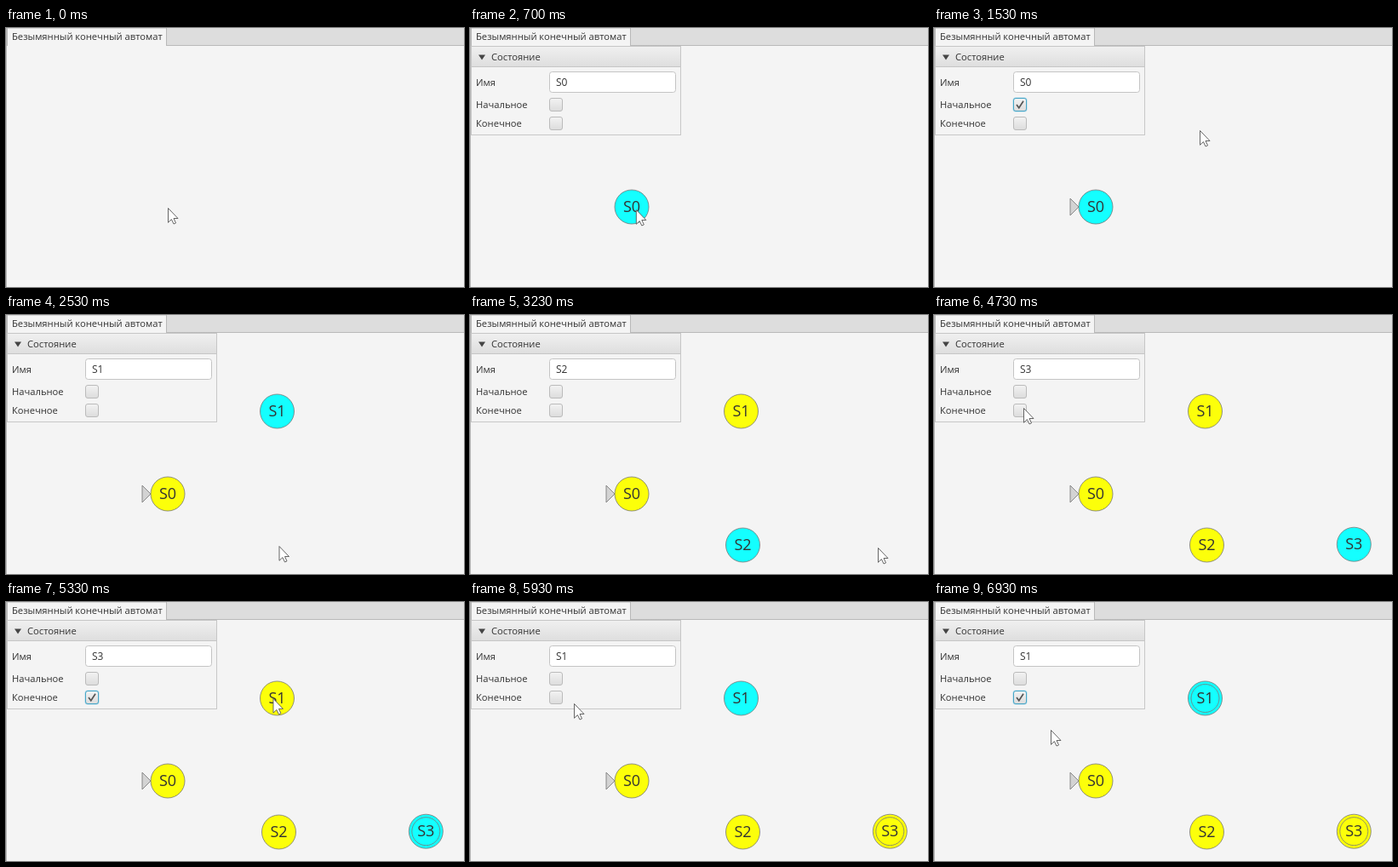
Recreate the animation shown at these times as an HTML page. Size 538 by 304 pixels, loop 6.97 s.

```html
<!DOCTYPE html>
<html lang="ru">
<head>
<meta charset="utf-8">
<style>
html, body { margin: 0; width: 100%; height: 100%; overflow: hidden; background: #f4f4f4; }
svg { display: block; width: 538px; height: 304px; }
text { font: 11.2px "Open Sans", "Noto Sans", sans-serif; fill: #333; }
#name { font-size: 12px; }
.state text { font-size: 18px; text-anchor: middle; }
.state circle { stroke: #777; stroke-width: .8; }
.state .ring { fill: none; }
</style>
</head>
<body>
<svg viewBox="0 0 538 304">
  <defs>
    <linearGradient id="title" x2="0" y2="1"><stop stop-color="#f0f0f0"/><stop offset="1" stop-color="#dedede"/></linearGradient>
    <linearGradient id="box" x2="0" y2="1"><stop stop-color="#f3f3f3"/><stop offset="1" stop-color="#dcdcdc"/></linearGradient>
  </defs>
  <rect width="538" height="304" fill="#f4f4f4"/>
  <rect width="538" height="20" fill="#dddddd"/>
  <path d="M0 20.5H538M.5 0V304" stroke="#b9b9b9"/>
  <path d="M1.5 21V0H188.5V21" fill="#f4f4f4" stroke="#b9b9b9"/>
  <rect x="2" y="19" width="186" height="3" fill="#f4f4f4"/>
  <text x="7" y="14">Безымянный конечный автомат</text>

  <g id="panel">
    <rect x="1.5" y="45.5" width="246" height="80" fill="#f4f4f4" stroke="#c8c8c8"/>
    <rect x="1.5" y="21.5" width="246" height="24" fill="url(#title)" stroke="#c6c6c6"/>
    <path d="M10 31.5H18L14 37.5Z" fill="#444"/>
    <text x="25" y="38">Состояние</text>
    <text x="7" y="68">Имя</text>
    <text x="7" y="94">Начальное</text>
    <text x="7" y="116">Конечное</text>
    <rect x="93.5" y="51.5" width="148" height="24" rx="3" fill="#fff" stroke="#c4c4c4"/>
    <text id="name" x="101" y="68"></text>
    <g id="boxes"></g>
  </g>
  <g id="states"></g>
  <path id="cursor" d="M.5 .5V17.3L4.4 13.6L7 19L9.5 17.9L7 12.5H12Z" fill="#fff" stroke="#555" stroke-width=".9" stroke-linejoin="round"/>
</svg>
<script>
const NS = "http://www.w3.org/2000/svg";
const LOOP = 6970;
const START = 1170, RESELECT = 5490;
const $ = id => document.getElementById(id);

function add(parent, tag, attrs = {}) {
  const el = document.createElementNS(NS, tag);
  for (const k in attrs) el.setAttribute(k, attrs[k]);
  return parent.appendChild(el);
}
function show(el, on) { el.style.display = on ? "" : "none"; }

// born: state is created; final: it becomes accepting
const states = [
  { x: 190, y: 210, born: 600 },
  { x: 318.5, y: 113, born: 2000, final: 6230 },
  { x: 320.5, y: 270, born: 2970 },
  { x: 493.3, y: 269.2, born: 3930, final: 4830 }
];

states.forEach((s, i) => {
  s.g = add($("states"), "g", { class: "state", transform: `translate(${s.x} ${s.y})` });
  if (i === 0) s.arrow = add(s.g, "path", { d: "M-30 -10V10L-20 0Z", fill: "#d3d3d3", stroke: "#888" });
  s.disc = add(s.g, "circle", { r: 20 });
  s.ring = add(s.g, "circle", { r: 16.5, class: "ring" });
  add(s.g, "text", { y: 6 }).textContent = "S" + i;
});

const boxes = [82, 104].map(y => {
  const g = add($("boxes"), "g", { transform: `translate(93 ${y})` });
  const glow = add(g, "rect", { x: -.5, y: -.5, width: 17, height: 17, rx: 3.5, fill: "#a9d8ea" });
  const frame = add(g, "rect", { x: .5, y: .5, width: 15, height: 15, rx: 2.5, fill: "url(#box)" });
  const tick = add(g, "path", { d: "M4 8L6.8 11.8L12 3.8", fill: "none", stroke: "#555", "stroke-width": 1.7 });
  return on => {
    show(glow, on);
    show(tick, on);
    frame.setAttribute("stroke", on ? "#45a5c6" : "#bbb");
  };
});

// The pointer rests at each stop and eases to the next one
const stops = [];
function stop(x, y, arrive, leave = arrive) { stops.push({ x, y, arrive, leave }); }
function create({ x, y, born }) {
  stop(x, y + 1, born - 440, born - 240);
  stop(x + 14, y + 15, born - 60, born + 20);
}
function press(x, y, t) { stop(x, y, t - 110, t + 40); }

create(states[0]);
press(101, 90, START);
stop(312, 120, 1530);
create(states[1]);
create(states[2]);
stop(479, 273, 3230);
create(states[3]);
press(105, 109, states[3].final);
press(319, 113, RESELECT);
stop(122, 119, 5930);
stop(99, 115, 6150, 6590);
stop(137, 150, 6930);

function cursorAt(t) {
  const i = stops.findIndex(s => t < s.arrive);
  if (i <= 0) {
    const { x, y } = i ? stops[stops.length - 1] : stops[0];
    return [x, y];
  }
  const a = stops[i - 1], b = stops[i];
  const u = Math.max(0, (t - a.leave) / (b.arrive - a.leave));
  const k = u * u * (3 - 2 * u);
  return [a.x + (b.x - a.x) * k, a.y + (b.y - a.y) * k];
}

function render(t) {
  const count = states.filter(s => t >= s.born).length;
  const current = t >= RESELECT ? 1 : count - 1;
  states.forEach((s, i) => {
    show(s.g, t >= s.born);
    show(s.ring, t >= s.final);
    s.disc.setAttribute("fill", i === current ? "#14ffff" : "#fcff0a");
  });
  show(states[0].arrow, t >= START);
  show($("panel"), count > 0);
  if (count) {
    $("name").textContent = "S" + current;
    boxes[0](current === 0 && t >= START);
    boxes[1](t >= states[current].final);
  }
  $("cursor").setAttribute("transform", `translate(${cursorAt(t)})`);
}

const begin = performance.now();
function tick() {
  render((performance.now() - begin) % LOOP);
  requestAnimationFrame(tick);
}
tick();
</script>
</body>
</html>
```
